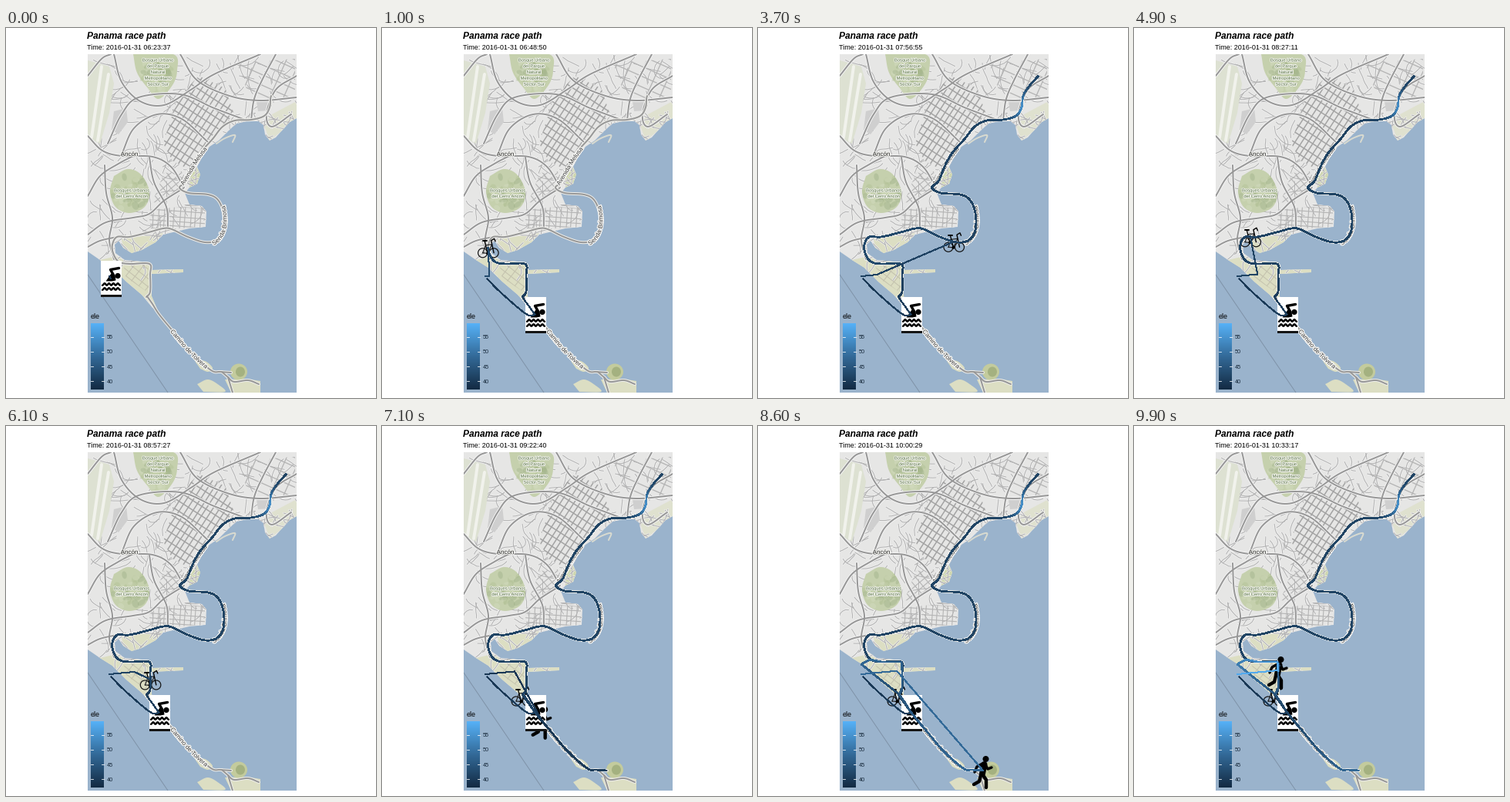
Write a matplotlib script that moves like this. It is 480 px wide and 480 px high and loops after 10 s.

```python
import numpy as np
import matplotlib.pyplot as plt
from matplotlib.animation import FuncAnimation
from matplotlib.collections import LineCollection
from matplotlib.colors import LinearSegmentedColormap
from matplotlib.patches import Circle, Ellipse, PathPatch, Polygon, Rectangle
from matplotlib.path import Path
from matplotlib.textpath import TextPath
from matplotlib.transforms import Affine2D
import matplotlib.patheffects as pe

FRAMES, STEPS = 100, 24
PX = 0.72  # points per pixel at 100 dpi
SANS = "Liberation Sans"
WATER, LAND, OLIVE = "#9ab3cc", "#e6e6e5", "#dcdec3"
ROAD, STREET = "#979797", "#b4b4b4"
rng = np.random.default_rng(7)
blues = LinearSegmentedColormap.from_list("ele", ["#132B43", "#336A98", "#56B1F7"])

fig = plt.figure(figsize=(4.8, 4.8), dpi=100, facecolor="white")
ax = fig.add_axes([0, 0, 1, 1])
ax.axis("off")
ax.set_autoscale_on(False)
ax.set(xlim=(0, 480), ylim=(480, 0))


# ---------- geometry ----------
def smooth(pts, n=10):
    """Catmull-Rom curve through pts."""
    p = np.array(pts, float)
    p = np.vstack([2 * p[0] - p[1], p, 2 * p[-1] - p[-2]])
    a, b, c, d = p[:-3, None], p[1:-2, None], p[2:-1, None], p[3:, None]
    t = np.linspace(0, 1, n, endpoint=False)[None, :, None]
    q = b + 0.5 * t * (c - a + t * (2 * a - 5 * b + 4 * c - d + t * (3 * (b - c) + d - a)))
    return np.vstack([q.reshape(-1, 2), p[-2]])


def dist(path):
    return np.r_[0, np.cumsum(np.hypot(*np.diff(path, axis=0).T))]


def at(path, s):
    d = dist(path)
    return np.column_stack([np.interp(s, d, path[:, k]) for k in (0, 1)])


def nearest(path, p):
    return dist(path)[np.argmin(np.hypot(*(path - p).T))]


# ---------- routes ----------
swim = smooth([(136, 325), (155, 344), (187, 371), (199, 372)])
bike = smooth([(182, 349), (187, 342), (187, 320), (186, 306), (160, 306), (146, 303),
               (139, 292), (138, 281), (144, 271), (160, 271), (185, 265), (204, 260),
               (215, 261), (236, 271), (258, 278), (274, 275), (282, 262), (282, 240),
               (275, 223), (262, 216), (237, 214), (225, 207), (234, 199), (242, 180),
               (252, 162), (268, 144), (281, 128), (297, 120), (318, 119), (335, 114),
               (342, 103), (344, 88), (353, 74), (364, 62)])
causeway = smooth([(183, 348), (190, 358), (199, 372), (218, 395), (240, 421),
                   (266, 444), (278, 446), (292, 447)])
loop = np.array([(183, 348), (160, 330), (134, 309), (145, 303), (160, 306),
                 (186, 306), (187, 318), (187, 340), (183, 348)], float)
run = np.vstack([causeway, causeway[::-1], loop, causeway, causeway[::-1], loop[:7]])


def bike_at(t):
    total = dist(bike)[-1]
    low = nearest(bike, (186, 306))
    leg = total - low
    s1, s2, s3 = (nearest(bike, p) for p in ((222, 264), (254, 277), (187, 329)))
    u = np.interp(t, [9, 21, 37, 61, 61.7],
                  [0, 2 * leg + s1, 2 * low + 6 * leg - s2,
                   2 * low + 10 * leg - s3, 2 * low + 10 * leg])
    w = (u - low) % (2 * leg)
    s = low + leg - np.abs(leg - w)
    s = np.where(u < low, u, s)
    s = np.where(u > low + 10 * leg, 2 * low + 10 * leg - u, s)
    return at(bike, s)


def run_at(t):
    c, lap = dist(causeway)[-1], dist(loop)[-1]
    back = 2 * c - nearest(causeway, (207, 382))
    s = np.interp(t, [61.7, 66.8, 71, 86, 99], [0, c, back, 3 * c + lap, dist(run)[-1]])
    return at(run, s)


T = np.linspace(0, FRAMES - 1, (FRAMES - 1) * STEPS + 1)
SWIM_END, BIKE_END = 9, 61.7
pos = np.where((T < SWIM_END)[:, None], at(swim, T / SWIM_END * dist(swim)[-1]),
               np.where((T < BIKE_END)[:, None], bike_at(T), run_at(T)))
ele = np.interp(T, [0, 9, 12, 21, 37, 61, 71, 76, 80, 86, 92, 99],
                [.1, .15, .45, .3, .18, .2, .1, .5, .35, .5, .2, .95])
ele += 0.55 * np.exp(-((pos[:, 0] - 343) ** 2 + (pos[:, 1] - 100) ** 2) / 300)


# ---------- map ----------
def area(pts, color, z=1, **kw):
    return ax.add_patch(Polygon(pts, closed=True, fc=color, lw=0, zorder=z, **kw))


def roads(lines, color, width, z, clip=None):
    lc = LineCollection(lines, colors=color, linewidths=width * PX, zorder=z, capstyle="round")
    ax.add_collection(lc, autolim=False)
    lc.set_clip_path(clip or frame)
    return lc


def grid(pts, angle, du, dv, width=1.1, color=STREET, z=3):
    """Two crossing sets of parallel streets inside a polygon."""
    shape = Polygon(pts, closed=True, transform=ax.transData)
    mid = np.mean(pts, axis=0)
    a = np.radians(angle)
    u, v = np.array([np.cos(a), np.sin(a)]), np.array([-np.sin(a), np.cos(a)])
    lines = []
    for p, q, step in ((u, v, du), (v, u, dv)):
        for k in np.arange(-110, 110, step):
            o = mid + q * (k + rng.uniform(-1, 1))
            lines.append([o - 120 * p, o + 120 * p])
    roads(lines, color, width, z, shape)


frame = ax.add_patch(Rectangle((106, 34), 271, 439, fc=WATER, lw=0, zorder=0))
coast = [(106, 34), (377, 34), (377, 117), (368, 122), (357, 134), (350, 142), (342, 146),
         (336, 138), (334, 126), (328, 121), (312, 121), (299, 124), (290, 132), (276, 146),
         (264, 154), (254, 168), (248, 180), (252, 190), (248, 202), (238, 207), (232, 214),
         (238, 229), (254, 231), (260, 238), (259, 258), (238, 260), (225, 263), (204, 268),
         (194, 278), (176, 288), (163, 292), (152, 285), (146, 276), (141, 281), (142, 292),
         (154, 301), (187, 304), (188, 314), (230, 313), (230, 317), (188, 319), (189, 348),
         (197, 367), (190, 363), (176, 346), (156, 329), (138, 311), (122, 301), (106, 290)]
land = area(coast, LAND)
area([(143, 296), (154, 302), (187, 304), (188, 314), (230, 313), (230, 317), (188, 319),
      (189, 348), (197, 367), (176, 346), (156, 329), (138, 311), (122, 301)], OLIVE, 1.1)
area([(334, 124), (345, 112), (377, 95), (377, 117), (368, 122), (357, 134), (342, 146)], "#dfe1cf", 1.1)
area([(150, 274), (190, 268), (204, 266), (194, 278), (176, 288), (163, 292), (152, 285)], OLIVE, 1.1)
area([(238, 184), (247, 180), (252, 190), (248, 202), (238, 207)], "#cfd7b1", 1.1)

# winding side streets
lines = []
for _ in range(330):
    p = np.array([rng.uniform(106, 377), rng.uniform(34, 300)])
    h = rng.choice([0.5, 2.1, 1.2, 2.7]) + rng.normal(0, .4)
    bend, pts = rng.normal(0, .16), [p]
    for _ in range(rng.integers(4, 10)):
        h += bend + rng.normal(0, .12)
        p = p + 4 * np.array([np.cos(h), np.sin(h)])
        pts.append(p)
    lines.append(pts)
roads(lines, "#fafafa", 2.2, 2, land)
roads(lines, STREET, 1.2, 2.1, land)

# airfield
area([(106, 42), (134, 50), (140, 72), (134, 110), (122, 150), (106, 142)], "#dde1d2", 2.2)
roads([[(111, 142), (124, 50)], [(119, 146), (133, 60)]], "#f1f2ec", 4, 2.3)
area([(140, 108), (156, 104), (158, 122), (146, 138), (137, 132)], "#cfcfcf", 2.2)
area([(325, 95), (342, 93), (342, 107), (327, 108)], "#cfcfcf", 2.2)


def park(pts, cx, cy, rx, ry):
    shape = area(smooth(pts + pts[:1]), "#c5d0ad", 3.2)
    shape.set_clip_path(frame)
    for _ in range(34):
        r, a = np.sqrt(rng.random()), rng.uniform(0, 2 * np.pi)
        blob = Ellipse((cx + rx * r * np.cos(a), cy + ry * r * np.sin(a)), rng.uniform(4, 12),
                       rng.uniform(4, 14), angle=rng.uniform(0, 180), lw=0, alpha=.3, zorder=3.3,
                       fc=str(rng.choice(["#8fa379", "#a9ba8b", "#dbe2c8"])))
        ax.add_patch(blob)
        blob.set_clip_path(frame if cy < 100 else shape)


park([(165, 34), (217, 34), (222, 55), (216, 74), (198, 92), (184, 78), (170, 58)], 195, 58, 20, 22)
park([(140, 192), (158, 183), (175, 190), (186, 212), (180, 232), (160, 240), (142, 232), (135, 212)],
     160, 212, 25, 27)

# regular quarters
downtown = [(222, 92), (250, 62), (284, 78), (296, 112), (262, 145), (238, 184), (216, 172), (204, 150)]
area(downtown, LAND, 2.5)
grid(downtown, -57, 7, 10, 1.5, "#a3a3a3")
grid([(184, 236), (226, 232), (258, 234), (258, 257), (226, 260), (188, 260)], 4, 6, 7)
grid([(205, 188), (228, 186), (230, 206), (205, 228), (190, 226)], -40, 7, 8)
grid([(152, 306), (184, 307), (186, 344), (156, 324)], 38, 8, 11, 1, "#c3c1ad")
grid([(300, 45), (375, 40), (375, 88), (318, 96)], 24, 12, 17, 1.3)

main = [smooth(p) for p in (
    [(106, 140), (125, 159), (150, 166), (190, 167), (214, 180), (231, 207)],
    [(140, 34), (150, 70), (174, 95), (205, 100), (240, 80), (270, 60), (330, 34)],
    [(106, 268), (130, 252), (165, 246), (186, 241), (205, 224), (230, 208)],
    [(106, 284), (122, 276), (144, 271)],
    [(226, 34), (248, 68), (290, 88), (330, 94), (377, 90)],
    [(310, 119), (270, 104), (226, 86), (172, 90), (150, 112), (132, 150)],
    [(106, 218), (122, 192), (146, 176), (165, 166)],
    [(186, 168), (192, 200), (208, 232), (210, 258)],
    [(350, 34), (333, 66), (322, 92), (318, 119)],
    [(106, 62), (124, 40), (136, 34)],
    [(128, 178), (130, 214), (138, 246), (134, 275), (140, 300)],
    [(377, 62), (350, 80), (338, 112), (345, 128), (370, 112)],
    [(262, 148), (228, 118), (196, 112), (166, 130), (150, 164)])]
roads(main, "#f7f7f7", 3.8, 3.5, land)
roads(main, ROAD, 2, 3.6, land)

# marina spit, causeway and islands
roads([smooth([(273, 150), (284, 143), (297, 139), (294, 148)])], "#d8dad0", 2, 1.5)
area(smooth([(245, 432), (258, 432), (268, 441), (262, 446), (252, 442)]), OLIVE)
area(smooth([(248, 462), (262, 456), (276, 463), (284, 472), (256, 472)]), OLIVE)
area([(284, 456), (312, 455), (330, 458), (330, 473), (292, 473)], OLIVE)
ax.add_patch(Ellipse((302, 446), 22, 21, fc="#c3cb9d", lw=0, zorder=1.2))
ax.add_patch(Ellipse((304, 446), 12, 13, fc="#98a675", lw=0, alpha=.7, zorder=1.3))
shore = [causeway, smooth([(280, 446), (288, 453), (296, 459), (314, 457), (328, 462)]),
         smooth([(288, 453), (291, 463), (294, 473)]), bike[:-20]]
roads(shore, "#eeeeea", 4, 3.7)
roads(shore, ROAD, 2, 3.8)
roads([[(106, 320), (210, 473)]], "#7d90a5", 0.9, 1.4)

# ---------- labels ----------
halo = [pe.withStroke(linewidth=1.8 * PX, foreground="#f4f4f0")]


def label(x, y, s, size, color, **kw):
    kw = {"ha": "center", "va": "baseline", "family": SANS, "zorder": 4.5, **kw}
    return ax.text(x, y, s, fontsize=size * PX, color=color, **kw)


def path_label(s, pts, size=8):
    """Bend a line of text along a curve."""
    curve = smooth(pts)
    glyphs = TextPath((0, 0), s, size=size, prop={"family": SANS})
    x, y = glyphs.vertices.T
    p = at(curve, x)
    d = at(curve, x + 2) - at(curve, x - 2)
    d /= np.maximum(np.hypot(*d.T), 1e-6)[:, None]
    v = p + np.column_stack([d[:, 1], -d[:, 0]]) * (y - .35 * size)[:, None]
    for color, width, z in (("#f4f4f2", 2.6, 4.4), ("#3c3c3c", 0, 4.5)):
        ax.add_patch(PathPatch(Path(v, glyphs.codes), fc=color, ec=color, lw=width * PX, zorder=z))


label(160, 166, "Ancón", 8, "#222222", path_effects=halo)
for k, s in enumerate(("Bosque Urbano", "del Parque", "Natural", "Metropolitano", "Sector Sur")):
    label(197, 43.5 + 7.8 * k, s, 5.8, "#54703f", path_effects=halo)
for k, s in enumerate(("Bosques Urbanos", "del Cerro Ancón")):
    label(163, 212.5 + 7.6 * k, s, 5.8, "#54703f", path_effects=halo)
path_label("Avenida Melusa", [(228, 203), (238, 187), (248, 170), (264, 148)])
path_label("Senda Brimosa", [(268, 280), (277, 272), (283, 258), (283, 240), (279, 222)])
path_label("Camino de Tolvera", [(215, 392), (240, 421), (266, 444), (284, 454)])

# ---------- title and legend ----------
label(105, 14, "Panama race path", 12, "black", ha="left", weight="bold", style="italic")
clock = label(105, 28, "", 9.05, "black", ha="left")
label(110, 377, "ele", 9, "black", ha="left", zorder=9)
ax.imshow(np.linspace(1, 0, 86)[:, None], cmap=blues, extent=(110, 127, 469, 383),
          aspect="auto", zorder=8, interpolation="nearest")
ax.set(xlim=(0, 480), ylim=(480, 0))
for k, s in enumerate(("55", "50", "45", "40")):
    y = 400.5 + 19.2 * k
    for x in (110, 123.6):
        ax.plot([x, x + 3.4], [y, y], color="white", lw=.8 * PX, zorder=9)
    label(131, y + 2.7, s, 7.4, "#16283a", ha="left", zorder=9)


# ---------- icons ----------
class Icon:
    def __init__(self, z):
        self.shift, self.z, self.parts = Affine2D(), z, []

    def add(self, patch):
        patch.set(transform=self.shift + ax.transData, zorder=self.z)
        self.parts.append(ax.add_artist(patch))

    def stroke(self, pts, width, color="black"):
        self.add(PathPatch(Path(pts), fc="none", ec=color, lw=width * PX,
                           capstyle="round", joinstyle="round"))

    def place(self, xy, visible=True):
        self.shift.clear().translate(*xy)
        for part in self.parts:
            part.set_visible(visible)


cycle = Icon(5)
for x in (-7, 7.5):
    cycle.add(Circle((x, 7), 6, fc="none", ec="#111111", lw=1.2 * PX))
cycle.stroke([(-7, 7), (-3, -3), (5, -4), (-.5, 7.5), (-7, 7)], 1.2, "#222222")
cycle.stroke([(-.5, 7.5), (-4.5, -8)], 1.3)
cycle.stroke([(-7, -8.5), (-2, -8.5)], 2)
cycle.stroke([(7.5, 7), (4, -9), (8, -11.5), (9.5, -8)], 1.4)
cycle.add(Circle((-.5, 7.5), 2, fc="black", lw=0))

runner = Icon(5.2)
runner.add(Circle((4.5, -17), 4, fc="black", lw=0))
runner.stroke([(2.5, -10), (0, 2)], 8)
runner.stroke([(4, -10), (7, -4), (12, -6)], 3.4)
runner.stroke([(0, -11), (-7, -7), (-10, 0)], 3.4)
runner.stroke([(1, 4), (5, 10), (5, 20)], 4.4)
runner.stroke([(-2, 4), (-4, 12), (-11, 16)], 4.4)

swimmer = Icon(5.4)
swimmer.add(Rectangle((-13.5, -23.5), 27, 47, fc="white", lw=0))
swimmer.add(Rectangle((-13.5, 20.2), 27, 3.3, fc="#151515", lw=0))
swimmer.add(Circle((8.5, -4), 3.6, fc="black", lw=0))
swimmer.stroke([(10, -14), (-1, -12), (3, -5)], 3.4)
swimmer.add(Polygon([(-7, 3), (0, -7), (5, -5), (6, 2), (1, 3)], fc="black", lw=0))
wx = np.linspace(-11.5, 11.5, 40)
for y in (7, 13):
    swimmer.stroke(np.column_stack([wx, y + 1.3 * np.cos(wx * 1.1)]), 2.4)

# ---------- trail ----------
segs = np.stack([pos[:-1], pos[1:]], axis=1)
trail = LineCollection([], colors=blues(ele[:-1]), antialiaseds=False, zorder=6,
                       linewidths=np.where(T[:-1] < SWIM_END, 1, 1.7) * PX)
ax.add_collection(trail, autolim=False)
tether, = ax.plot([], [], lw=PX, antialiased=False, zorder=6.1)
START, FINISH = np.array([134, 322]), np.array([187, 317])
BEGIN = 6 * 3600 + 23 * 60 + 37.32  # seconds after midnight


def update(i):
    k = i * STEPS
    here = pos[k]
    trail.set_segments(segs[:k])
    mid = START + (FINISH - START) * i / (FRAMES - 1)
    tether.set_data(*np.array([START, mid, here]).T)
    tether.set_color(blues(ele[k]))
    swimmer.place(here + (.5, .5) if i < SWIM_END else (199.5, 372.5))
    cycle.place(here if i < BIKE_END else (181, 350), i >= SWIM_END)
    runner.place(here + (-1, 2), i >= BIKE_END)
    now = int(BEGIN + 151.31 * i)
    clock.set_text(f"Time: 2016-01-31 {now // 3600:02}:{now // 60 % 60:02}:{now % 60:02}")
    return trail, tether, clock


anim = FuncAnimation(fig, update, frames=FRAMES, interval=100, repeat=True, repeat_delay=0)
plt.show()
```
